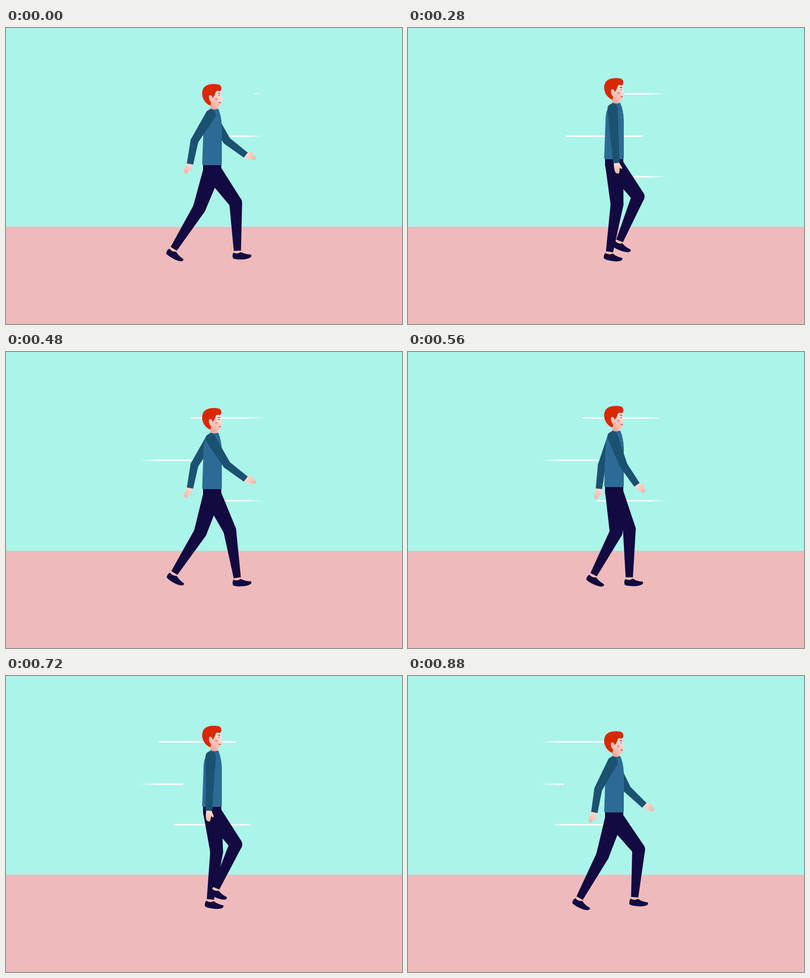
An HTML page with a canvas that plays this animation: 800x600 px, repeating every 920 ms.

```html
<!DOCTYPE html>
<html lang="en">
<head>
<meta charset="utf-8">
<title>Walk cycle</title>
<style>
  html, body { margin: 0; width: 100%; height: 100%; overflow: hidden; background: #abf4ea; }
  canvas { display: block; width: 800px; height: 600px; }
</style>
</head>
<body>
<canvas id="stage" width="800" height="600"></canvas>
<script>
const ctx = document.getElementById('stage').getContext('2d');
const LOOP = 920, STEP = 40, RAD = Math.PI / 180;
const NAVY = '#120a40', SHIRT = '#2d6b97', SLEEVE = '#1c5271', HAIR = '#da2803';
const THIGH = 80.5, SHIN = 97.5, UPPER = 62, FORE = 48;

// One stride, shared by both legs: time, thigh angle, shin angle
const stride = [
  [0, 36, 2], [20, 26, 9], [120, 21, -2], [280, 4, -9],
  [460, -19, -32], [580, 8, -27], [680, 33, -27], [800, 37, -16]
];

// Smooth periodic curve through the rows
function sample(rows, t) {
  const n = rows.length;
  const row = i => rows[(i + n) % n];
  const time = i => row(i)[0] + Math.floor(i / n) * LOOP;
  let i = n - 1;
  while (rows[i][0] > t) i--;
  const h = time(i + 1) - time(i), u = (t - time(i)) / h;
  const u2 = u * u, u3 = u2 * u;
  return row(i).slice(1).map((a, k) => {
    const c = k + 1, b = row(i + 1)[c];
    const m0 = h * (b - row(i - 1)[c]) / (time(i + 1) - time(i - 1));
    const m1 = h * (row(i + 2)[c] - a) / (time(i + 2) - time(i));
    return a * (2 * u3 - 3 * u2 + 1) + m0 * (u3 - 2 * u2 + u) +
           b * (3 * u2 - 2 * u3) + m1 * (u3 - u2);
  });
}

// Angle within the cycle, zero at full stretch
const cycle = t => 2 * Math.PI * (t - 10) / LOOP;

function shape(d, fill) {
  ctx.fillStyle = fill;
  ctx.fill(new Path2D(d));
}

function disc(x, y, r, fill) {
  ctx.fillStyle = fill;
  ctx.beginPath();
  ctx.arc(x, y, r, 0, 7);
  ctx.fill();
}

function taper([x1, y1], r1, [x2, y2], r2, fill) {
  const len = Math.hypot(x2 - x1, y2 - y1);
  const nx = (y1 - y2) / len, ny = (x2 - x1) / len;
  ctx.fillStyle = fill;
  ctx.beginPath();
  ctx.moveTo(x1 + nx * r1, y1 + ny * r1);
  ctx.lineTo(x2 + nx * r2, y2 + ny * r2);
  ctx.lineTo(x2 - nx * r2, y2 - ny * r2);
  ctx.lineTo(x1 - nx * r1, y1 - ny * r1);
  ctx.fill();
}

// Angles count forward from straight down
const reach = ([x, y], len, deg) =>
  [x + len * Math.sin(deg * RAD), y + len * Math.cos(deg * RAD)];

function limb(root, joint, end, [r0, r1, r2], fill) {
  disc(...root, r0, fill);
  taper(root, r0, joint, r1, fill);
  disc(...joint, r1, fill);
  taper(joint, r1, end, r2, fill);
}

function placed([x, y], deg, draw) {
  ctx.save();
  ctx.translate(x, y);
  ctx.rotate(deg * RAD);
  draw();
  ctx.restore();
}

function fade(x0, y0, x1, y1, ...colors) {
  const g = ctx.createLinearGradient(x0, y0, x1, y1);
  colors.forEach((c, i) => g.addColorStop(i / (colors.length - 1), c));
  return g;
}

function foot() {
  shape('M-5 -4H5L6 8H-7Z', '#f6bdb0');
  shape('M-7.5 4Q-11 9 -8.5 15.500Q-4 18 7 17.500Q19 17.500 26 13.500Q29.500 11.500 28 7.500Q19 7 13 5Q9 3 7 2.500Q0 7.500 -7.500 4Z', NAVY);
}

function hand() {
  shape('M-5 -2H5Q7 4 10 9Q11 13 9 13L5.500 10.500Q5 16 3.500 21Q0 23 -4 19Q-6.500 12 -5 -2Z',
    fade(0, 0, 0, 22, '#fcdcd2', '#f3b3a4'));
}

function leg(t, dy) {
  const [thigh, shin] = sample(stride, t % LOOP);
  const hip = [416.7, 289 + dy];
  const knee = reach(hip, THIGH, thigh), ankle = reach(knee, SHIN, shin);
  placed(ankle, Math.max(0, 3 - .9 * shin), foot);
  limb(hip, knee, ankle, [18.3, 13, 7.3], NAVY);
}

function arm(t, dy) {
  const a = cycle(t);
  const upper = -27 * Math.cos(a) - 5 * Math.cos(3 * a);
  const fore = upper + 10 + 11 * Math.cos(2 * a);
  const shoulder = [413.5, 176 + dy];
  const elbow = reach(shoulder, UPPER, upper), wrist = reach(elbow, FORE, fore);
  placed(wrist, -fore - .55 * upper, hand);
  limb(shoulder, elbow, wrist, [10.5, 8, 6.5], SLEEVE);
}

function head() {
  shape('M416 136L421 127Q428 123 434 126L434.5 139L438 147Q437 149.5 434 150L434 154Q433 158.5 427 159L428 166Q420 169 413 165V146Z',
    fade(413, 160, 436, 134, '#f2a497', '#f9c9bd', '#fde6df'));
  shape('M413 157.5C399 152 393 135 398 124C403 113 420 112 431 115C437 118 436 128 431 128.5Q427 126 424 129Q422 137 418 141L415 148Z', HAIR);
  shape('M410 137Q415 134 417 140Q419 147 415 151Q409 147 410 137Z', '#f8c4b7');
  disc(425, 144, 3, '#f49c98');
  disc(430.3, 137, 1, '#2a1a3a');
  shape('M426.5 133Q430 130.5 433 132.5L432.5 134Q430 132.5 426.5 133Z', '#a4210c');
  shape('M429 150.5L434 150.5L433.5 152.5Q431 153 429 150.5Z', '#bb3a35');
}

function torso() {
  shape('M413 163.5Q421 168 429 164Q435 178 436 198V275Q436 278 433 278H399Q396 278 396.4 274L399 200Q399 174 413 163.5Z', SHIRT);
  ctx.strokeStyle = '#20557a';
  ctx.lineWidth = 1.5;
  ctx.stroke(new Path2D('M413 164Q421 168.5 429 164.5'));
}

function streaks(t) {
  const clear = 'rgba(255,255,255,0)';
  ctx.fillStyle = fade(268, 0, 523, 0, clear, '#fff', '#fff', '#fff', '#fff', '#fff', clear);
  for (const [y, x] of [[133, 500], [219, 393], [301, 530]]) {
    ctx.fillRect(x - t * .265, y - 1, 155.5, 3);
  }
}

function draw(t) {
  const dy = -13 * Math.sin(cycle(t)) ** 2;
  const opposite = t + LOOP / 2;
  ctx.fillStyle = '#abf4ea';
  ctx.fillRect(0, 0, 800, 403);
  ctx.fillStyle = '#efbabb';
  ctx.fillRect(0, 403, 800, 197);
  streaks(t);

  arm(opposite, dy);
  leg(opposite, dy);
  leg(t, dy);
  ctx.save();
  ctx.translate(0, dy);
  shape('M398 274H435V289H398Z', NAVY);
  head();
  torso();
  ctx.restore();
  arm(t, dy);
}

const start = performance.now();
function tick() {
  const t = (performance.now() - start) % LOOP;
  draw(Math.floor(t / STEP) * STEP);
  requestAnimationFrame(tick);
}
tick();
</script>
</body>
</html>
```
